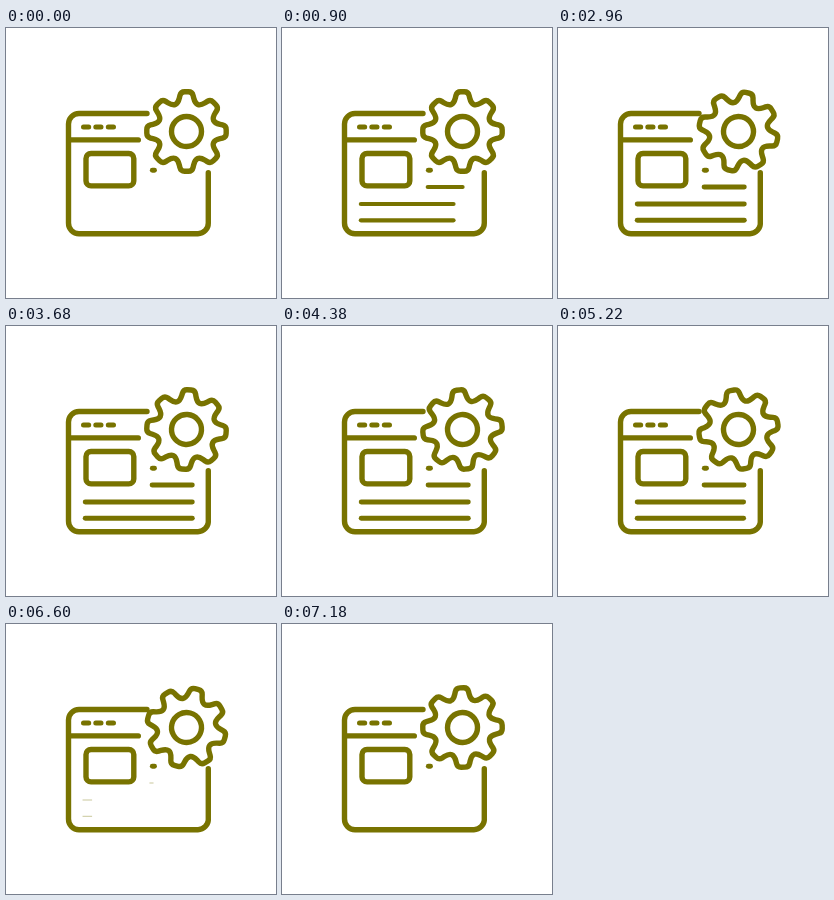
Recreate the animation shown at these times as an HTML page. Size 270 px wide and 270 px high, loop 7200 ms.

```html
<!DOCTYPE html>
<html lang="en">
<head>
<meta charset="utf-8">
<title>Page settings icon</title>
<style>
  html, body { margin: 0; width: 100%; height: 100%; overflow: hidden; background: #fff; }
  svg { display: block; width: 100vw; height: 100vh; }
</style>
</head>
<body>
<svg viewBox="0 0 270 270" fill="none" stroke="#787300" stroke-width="5.4" stroke-linecap="round" stroke-linejoin="round">
  <path d="M141 85.500H73A10.500 10.500 0 0 0 62.500 96V195A10.500 10.500 0 0 0 73 205.700H192A10.500 10.500 0 0 0 202.300 195V144.700"/>
  <path d="M64 111.900H132.300"/>
  <path d="M77.500 98.900H82.700M89.800 98.900H95M102.300 98.900H107.500" stroke-width="5"/>
  <rect x="80" y="125.500" width="47.800" height="32.400" rx="5"/>
  <path d="M146.300 142.200H148.500" stroke-width="4.900"/>
  <g id="lines" stroke-width="4.900"></g>
  <g id="gear">
    <path id="teeth"/>
    <circle r="15"/>
  </g>
</svg>
<script>
const LOOP = 7200;
const GROW = [0, 1850];
const SHRINK = [4900, 6650];
const CENTER = [180.5, 103.5];
const LINE_END = 186.3;
const CAP = 2.45;

const clamp = v => Math.min(1, Math.max(0, v));
const span = (t, [from, to]) => clamp((t - from) / (to - from));

// One tooth pointing up; its corners are rounded after repeating it.
const TOOTH = [[-8.4, -28.2], [-5.7, -39.7], [5.7, -39.7], [8.4, -28.2]];
const TIP_CUT = 3.8, VALLEY_CUT = 3, FLANK_CUT = 5.5;

function gearPath() {
  const points = [];
  for (let i = 0; i < 8; i++) {
    const c = Math.cos(i * Math.PI / 4), s = Math.sin(i * Math.PI / 4);
    TOOTH.forEach(([x, y]) => points.push([x * c - y * s, x * s + y * c]));
  }
  const toward = (a, b, d) => {
    const k = d / Math.hypot(b[0] - a[0], b[1] - a[1]);
    return [a[0] + (b[0] - a[0]) * k, a[1] + (b[1] - a[1]) * k];
  };
  const cuts = [[VALLEY_CUT, FLANK_CUT], [TIP_CUT, TIP_CUT], [TIP_CUT, TIP_CUT], [FLANK_CUT, VALLEY_CUT]];
  const n = points.length;
  return points.map((p, i) => {
    const [before, after] = cuts[i % 4];
    const start = toward(p, points[(i + n - 1) % n], before);
    const end = toward(p, points[(i + 1) % n], after);
    return `${i ? "L" : "M"}${start}Q${p} ${end}`;
  }).join("") + "Z";
}

document.getElementById("teeth").setAttribute("d", gearPath());
const gear = document.getElementById("gear");
const lineGroup = document.getElementById("lines");

// Each line scales, thickness included, from its outer left edge.
const lines = [[146.1, 159], [79.2, 176], [79.2, 192.3]].map(([x, y]) => {
  const el = document.createElementNS("http://www.w3.org/2000/svg", "path");
  el.setAttribute("d", `M${CAP} 0H${CAP + LINE_END - x}`);
  lineGroup.append(el);
  return { el, left: x - CAP, y };
});

function draw(t) {
  gear.setAttribute("transform", `translate(${CENTER}) rotate(${360 * t / LOOP})`);
  const size = 1 - (1 - span(t, GROW)) ** 3 - span(t, SHRINK) ** 3;
  for (const { el, left, y } of lines) {
    el.setAttribute("transform", `translate(${left} ${y}) scale(${size})`);
  }
}

const began = performance.now();
function tick() {
  draw((performance.now() - began) % LOOP);
  requestAnimationFrame(tick);
}
draw(0);
requestAnimationFrame(tick);
</script>
</body>
</html>
```
